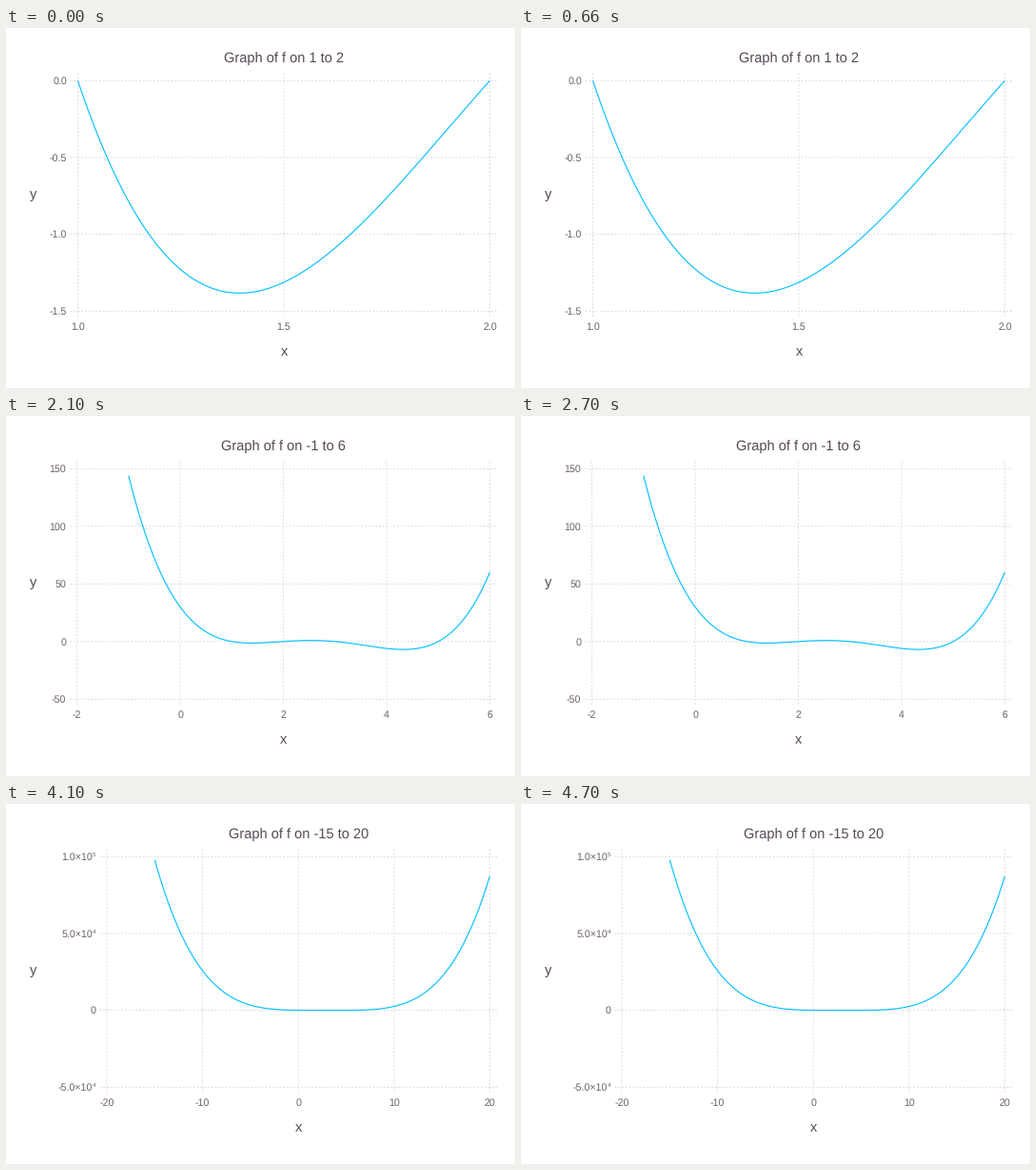
A matplotlib script that plays this animation: 535 by 378 pixels, repeating every 5100 ms.

```python
import numpy as np
import matplotlib.pyplot as plt
from matplotlib.animation import FuncAnimation

W, H, DPI = 535, 378, 64
PT = 72 / DPI                      # points per pixel
MM = 3.78                          # pixels per millimetre
TOP, BOTTOM, RIGHT = 55.3, 297.3, 508.5
PAD = 2 * MM
MAJOR, MINOR = 14.67, 10.67        # text sizes in pixels
SUP = 0.6                          # exponent scale

plt.rcParams.update({
    "font.family": "Liberation Sans",
    "text.hinting": "none",
    "axes.unicode_minus": False,
})

# left edge, curve domain, x labels, y labels (bottom to top); "^" marks an exponent
SCENES = [
    (75.5, (1, 2), "1.0 1.5 2.0", "-1.5 -1.0 -0.5 0.0"),
    (73.0, (0, 4), "0 1 2 3 4", "-10 0 10 20 30"),
    (74.6, (-1, 6), "-2 0 2 4 6", "-50 0 50 100 150"),
    (97.0, (-10, 15), "-10 -5 0 5 10 15", "-1×10^4 0 1×10^4 2×10^4 3×10^4"),
    (106.0, (-15, 20), "-20 -10 0 10 20", "-5.0×10^4 0 5.0×10^4 1.0×10^5"),
]

fig = plt.figure(figsize=(W / DPI, H / DPI), dpi=DPI, facecolor="white")
ax = fig.add_axes([0, 0, 1, 1])


def f(x):
    return (x - 1) * (x - 2) * (x - 3) * (x - 5)


def value(label):
    base, _, power = label.partition("×10^")
    return float(base) * 10 ** int(power or 0)


def text(x, y, s, size=MINOR, color="#6c606b", ha="center"):
    ax.text(x, y, s, size=size * PT, color=color, ha=ha, va="baseline")


def title(x, y, s):
    text(x, y, s, MAJOR, "#564a55")


def tick_label(x, y, label):
    base, _, power = label.partition("^")
    if power:
        text(x, y - 0.36 * MINOR, power, MINOR * SUP, ha="right")
        x -= 0.556 * MINOR * SUP
    text(x, y, base, ha="right")


def grid_line(xs, ys):
    ax.plot(xs, ys, color="#d0d0e0", lw=0.2 * MM * PT, ls=(0, (2.5, 2.5)),
            dash_capstyle="butt", snap=False)


def draw_graph(left, domain, x_text, y_text):
    x_labels, y_labels = x_text.split(), y_text.split()
    x_lim = value(x_labels[0]), value(x_labels[-1])
    y_lim = value(y_labels[0]), value(y_labels[-1])

    def to_x(v):
        return left + (v - x_lim[0]) / (x_lim[1] - x_lim[0]) * (RIGHT - left)

    def to_y(v):
        return BOTTOM + (v - y_lim[0]) / (y_lim[1] - y_lim[0]) * (TOP - BOTTOM)

    for label in y_labels:
        y = to_y(value(label))
        grid_line([left - PAD, RIGHT + PAD], [y, y])
        tick_label(left - PAD - MM, y + 3.7, label)
    for label in x_labels:
        x = to_x(value(label))
        grid_line([x, x], [TOP - PAD, BOTTOM + PAD])
        text(x, 317, label)

    xs = np.linspace(*domain, 250)
    ax.plot(to_x(xs), to_y(f(xs)), color="#00bfff", lw=0.3 * MM * PT,
            solid_capstyle="butt", snap=False)

    mid = (left + RIGHT) / 2
    title(mid, 36, "Graph of f on {} to {}".format(*domain))
    title(mid, 344, "x")
    title(28.5, 180, "y")


def update(i):
    ax.clear()
    ax.set_axis_off()
    ax.set(xlim=(0, W), ylim=(H, 0))
    # the first graph holds 1100 ms, the others 1000 ms each
    draw_graph(*SCENES[max(i - 1, 0) // 10])
    return []


anim = FuncAnimation(fig, update, frames=51, interval=100,
                     repeat=True, repeat_delay=0, blit=False)
plt.show()
```
